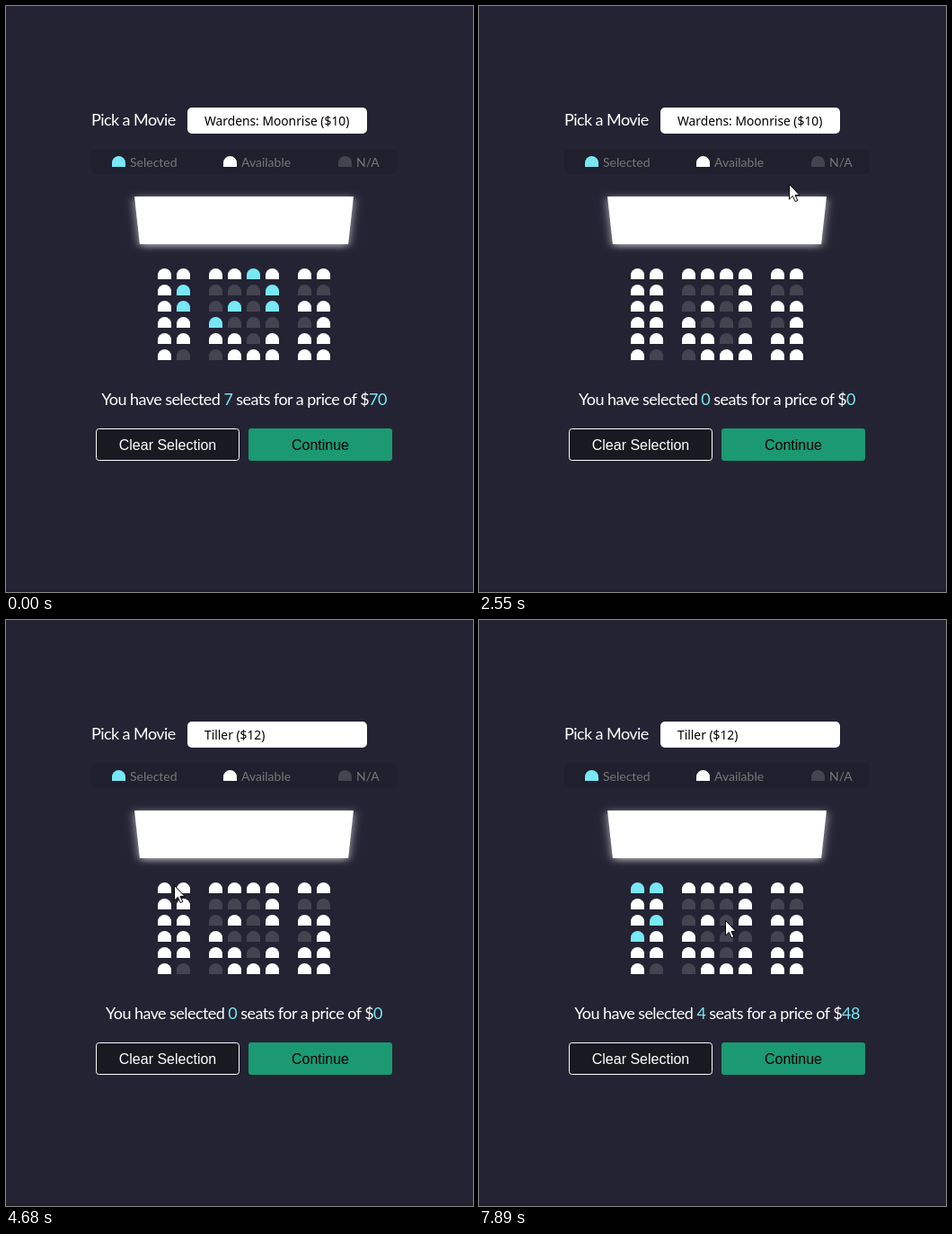
Recreate the animation shown at these times as an HTML page. Size 520 by 652 pixels, loop 7990 ms.

```html
<!DOCTYPE html>
<html lang="en">
<head>
<meta charset="utf-8">
<title>Seat booking</title>
<style>
html, body { margin: 0; width: 100%; height: 100%; overflow: hidden; background: #242333; }
svg { position: absolute; left: 0; top: 0; }
text { font: 18px Lato, sans-serif; letter-spacing: -.56px; fill: #fff; white-space: pre; }
.legend text { font-size: 14px; letter-spacing: 0; fill: #777; }
.option text, text.option { font: 13.8px "Noto Sans", sans-serif; letter-spacing: 0; fill: #000; }
.button text { font: 16px "Liberation Sans", Arial, sans-serif; letter-spacing: 0; text-anchor: middle; }
.free { fill: #fff; }
.taken { fill: #444451; }
.picked, tspan { fill: #78e8f5; }
#hall { position: absolute; left: 146px; top: 204px; width: 238px; height: 70px; perspective: 1000px; perspective-origin: 50% 105px; }
#screen { height: 100%; background: #fff; transform: rotateX(-45deg); box-shadow: 0 3px 10px rgba(255, 255, 255, .7); }
</style>
</head>
<body>
<div id="hall"><div id="screen"></div></div>
<svg width="520" height="652" viewBox="0 0 520 652">
  <defs><path id="seat" d="M0 12V7.5a7.5 7.5 0 0 1 15 0V12z"/></defs>
  <rect y="649" width="520" height="3" fill="#201f2d"/>
  <text x="95" y="133">Pick a Movie</text>
  <rect x="202" y="113" width="200" height="29" rx="5" fill="#fff"/>
  <text id="movie" class="option" x="221" y="133"></text>
  <g class="legend">
    <rect x="95" y="159" width="340" height="28" rx="5" fill="#000" fill-opacity=".1"/>
    <use href="#seat" class="picked" x="118" y="167"/><text x="138" y="179">Selected</text>
    <use href="#seat" class="free" x="242" y="167"/><text x="262" y="179">Available</text>
    <use href="#seat" class="taken" x="370" y="167"/><text x="390" y="179">N/A</text>
  </g>
  <g id="seats"></g>
  <text x="265" y="444" text-anchor="middle">You have selected <tspan id="count"></tspan> seats for a price of $<tspan id="total"></tspan></text>
  <g class="button" id="clear">
    <rect x="100.5" y="470.5" width="159" height="35" rx="3" fill="#191921" stroke="#fff"/>
    <text x="180" y="494">Clear Selection</text>
  </g>
  <g class="button">
    <rect x="270" y="470" width="160" height="36" rx="3" fill="#1b9972"/>
    <text x="350" y="494" style="fill:#000">Continue</text>
  </g>
  <g id="menu" class="option">
    <rect x="201.5" y="142.5" width="199" height="106" fill="#fff" stroke="#999"/>
    <rect id="mark" x="202" width="198" height="27" fill="#39f"/>
  </g>
  <g id="cursor" fill="#fff" stroke="#000" stroke-linejoin="round">
    <path id="arrow" d="M.5.5V17l3.8-3.6 2.9 6.2 2.6-1.2-2.8-6H12z"/>
    <path id="hand" d="M-1.5 13V1.5a1.5 1.5 0 0 1 3 0V7q3-1 3.2 1 2.6-1 2.8 1.2 2-.6 2 1.8V16l-2 4v3H-2.5v-2.5L-5.5 14.5q-.8-2.5 1-2.8 1.4 0 3 3z"/>
  </g>
</svg>
<script>
const LOOP = 7990, STEP = 95, ENTER = 80, CLEARED = 1160, OPENED = 2740, CHOSEN = 3740;
const $ = id => document.getElementById(id);
const make = (parent, tag, attrs) => {
  const el = document.createElementNS("http://www.w3.org/2000/svg", tag);
  for (const key in attrs) el.setAttribute(key, attrs[key]);
  return parent.appendChild(el);
};
const show = (id, on) => $(id).setAttribute("visibility", on ? "visible" : "hidden");

const movies = ["Wardens: Moonrise ($10)", "Tiller ($12)", "Hat Tally 4 ($8)", "Elk Baron ($9)"];
const options = movies.map((name, i) => {
  const el = make($("menu"), "text", { x: 208, y: Math.round(162 + 26.3 * i) });
  el.textContent = name;
  return el;
});

// o available, x not available, s selected at the start
const plan = ["oooosooo", "osxxxsxx", "osxsxsoo", "oosxxxxo", "ooooxooo", "oxxooooo"];
const clicks = { "00": 5440, "01": 5540, "21": 6000, "30": 7330 };
const seats = plan.flatMap((row, r) => [...row].map((kind, c) => ({
  kind,
  x: 169 + 21 * c + 15 * ((c > 1) + (c > 5)),
  y: 292 + 18 * r,
  clicked: clicks[`${r}${c}`],
  el: make($("seats"), "use", { href: "#seat" })
})));

// Where the pointer rests or turns: time, x, y
const stops = [
  [ENTER, 95, 563], [520, 216, 281], [980, 208, 487], [1470, 208, 492], [1957, 478, 365],
  [2250, 388, 291], [2646, 315, 132], [3140, 277, 173], [CHOSEN, 270, 193], [4228, 160, 343],
  [4680, 187, 295], [5360, 174, 300], [5560, 195, 299], [5720, 195, 315], [6480, 196, 336],
  [6840, 173, 344], [7330, 177, 350], [7890, 274, 334]
];

function pointerAt(time) {
  if (time < ENTER) return null;
  const t = Math.max(ENTER, Math.floor(time / STEP) * STEP);
  const i = stops.findLastIndex(stop => stop[0] <= t);
  const [t0, x0, y0] = stops[i], [t1, x1, y1] = stops[i + 1] || [LOOP, x0, y0];
  const u = (t - t0) / (t1 - t0), k = u * u * (3 - 2 * u);
  return { x: Math.round(x0 + (x1 - x0) * k), y: Math.round(y0 + (y1 - y0) * k) };
}

function draw(time) {
  const p = pointerAt(time);
  const over = (x, y, w, h) => !!p && p.x >= x && p.x < x + w && p.y >= y && p.y < y + h;
  let count = 0, onSeat = false;

  for (const { kind, x, y, clicked, el } of seats) {
    const picked = time < CLEARED ? kind === "s" : time >= clicked;
    const hover = kind !== "x" && over(x, y, 15, 12);
    if (picked) count++;
    if (hover) onSeat = true;
    el.setAttribute("class", picked ? "picked" : kind === "x" ? "taken" : "free");
    el.setAttribute("transform", `translate(${x} ${y})` +
      (hover ? "translate(7.5 6) scale(1.2) translate(-7.5 -6)" : ""));
  }

  const chosen = time < CHOSEN ? 0 : 1;
  $("movie").textContent = movies[chosen];
  $("count").textContent = count;
  $("total").textContent = count * (chosen ? 12 : 10);

  const grow = over(100, 470, 160, 36) ? 1.01 : 1;
  $("clear").setAttribute("transform", `translate(180 488) scale(${grow}) translate(-180 -488)`);

  show("menu", time >= OPENED && time < CHOSEN);
  const active = p && p.y >= 169 ? 1 : 0;
  $("mark").setAttribute("y", active ? 169 : 143);
  options.forEach((el, i) => el.style.fill = i === active ? "#fff" : "#000");

  show("arrow", p && !onSeat);
  show("hand", p && onSeat);
  if (p) $("cursor").setAttribute("transform", `translate(${p.x} ${p.y})`);
}

function frame() {
  draw(performance.now() % LOOP);
  requestAnimationFrame(frame);
}
frame();
</script>
</body>
</html>
```
